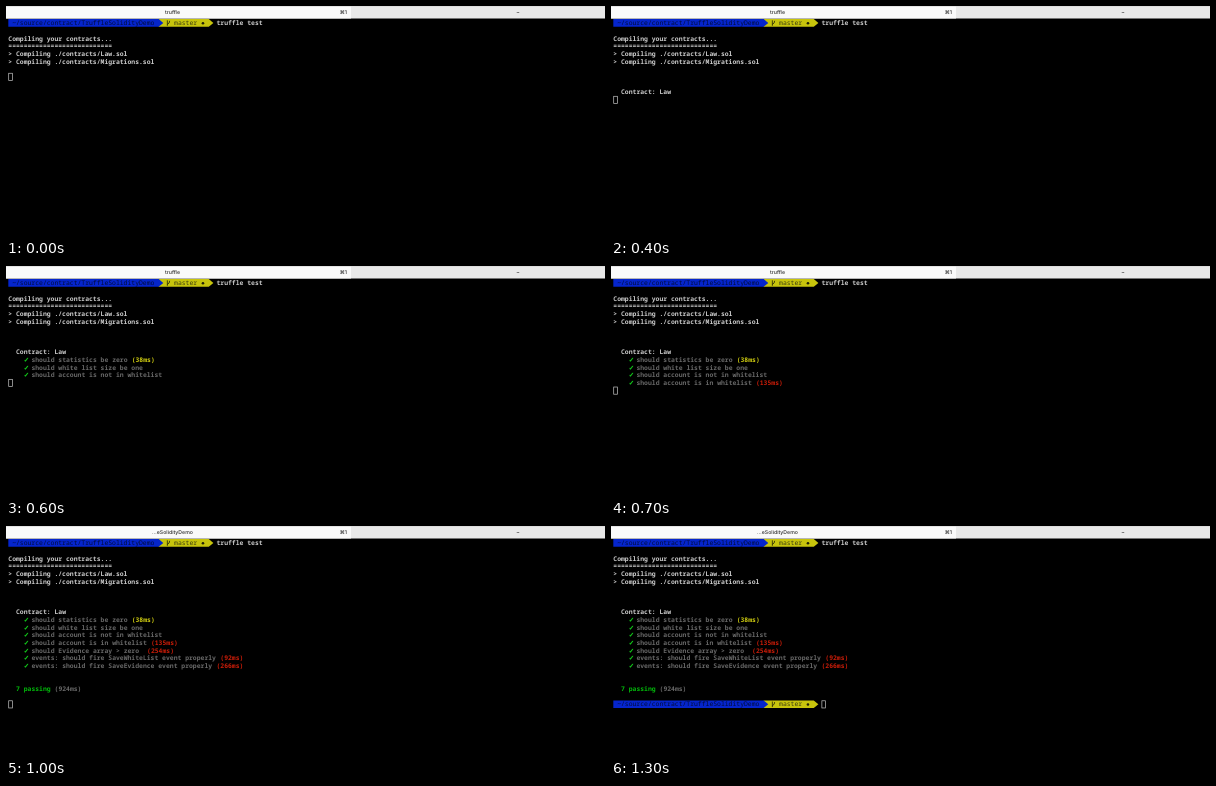
Animation of 599 by 232 pixels, one loop 1.4 s. Source, as an HTML page:

```html
<!DOCTYPE html>
<html lang="en">
<head>
<meta charset="utf-8">
<title>Terminal test run</title>
<style>
  html, body { margin: 0; width: 100%; height: 100%; overflow: hidden; background: #000; }
  svg { display: block; width: 599px; height: 232px; }
  text { font: 600 6.425px "Noto Sans Mono", "DejaVu Sans Mono", monospace; white-space: pre; text-rendering: geometricPrecision; }
  .tab { font: 500 5.2px Inter, "DejaVu Sans", sans-serif; fill: #2c2c2c; text-anchor: middle; }
  .path { fill: #000c38; font-weight: 500; }
  .branch { fill: #3a3a12; font-weight: 500; }
  .main { fill: #cacaca; }
  .dim { fill: #686868; }
  .warn { fill: #cfcc10; }
  .slow { fill: #c81c08; }
  .good { fill: #00b80a; }
  .tick { font-family: "DejaVu Sans", sans-serif; font-size: 6.6px; fill: #14d21c; stroke: #14d21c; stroke-width: .3px; }
  .faint { font-family: "DejaVu Sans", sans-serif; font-size: 5.4px; fill: #808080; }
</style>
</head>
<body>
<svg id="stage" viewBox="0 0 599 232">
  <rect width="599" height="232" fill="#000"/>
  <rect width="599" height="12.5" fill="#e9e9e9"/>
  <rect width="345" height="12.5" fill="#fafafa"/>
  <rect width="599" height=".6" fill="#d6d6d6"/>
  <text id="title" class="tab" x="166.5" y="8.3">truffle</text>
  <text class="tab" x="337.3" y="8.3">⌘1</text>
  <text class="tab" x="512" y="8.3">~</text>
</svg>
<script>
const LOOP = 1400, CELL = 3.855, ROW = 7.68, LEFT = 2.3, TOP = 13.1;
const stage = document.getElementById('stage');
const title = document.getElementById('title');
const timed = [];

const colX = col => LEFT + col * CELL;
const rowY = row => TOP + row * ROW;

function add(tag, attrs, from = 0, to = LOOP) {
  const el = document.createElementNS('http://www.w3.org/2000/svg', tag);
  for (const key in attrs) el.setAttribute(key, attrs[key]);
  stage.append(el);
  if (from > 0 || to < LOOP) timed.push({ el, from, to });
  return el;
}

function write(row, col, kind, str, from, to) {
  add('text', { x: colX(col), y: rowY(row) + 6.1, class: kind }, from, to).textContent = str;
}

function prompt(row, from) {
  const y = rowY(row), mid = y + ROW / 2, end = y + ROW;
  const flag = (a, b, fill) => add('path', {
    d: `M${colX(a)} ${y}H${colX(b)}L${colX(b + 1.2)} ${mid}L${colX(b)} ${end}H${colX(a)}Z`, fill
  }, from);
  flag(39, 52, '#c7c40c');
  flag(0, 39, '#0525cc');
  write(row, 1, 'path', '~/source/contract/TruffleSolidityDemo', from);
  const x = colX(41) + 1;
  add('path', {
    d: `M${x} ${y + 1.2}V${end - 1}M${x} ${mid + 1.4}Q${x + 2.3} ${mid + .6} ${x + 2.3} ${y + 1.7}`,
    fill: 'none', stroke: '#222208', 'stroke-width': .8
  }, from);
  write(row, 43, 'branch', 'master', from);
  add('circle', { cx: colX(50) + 1.9, cy: mid + .3, r: 1.3, fill: '#222208' }, from);
}

prompt(0);
write(0, 54, 'main', 'truffle test');
write(2, 0, 'main', 'Compiling your contracts...');
write(3, 0, 'main', '='.repeat(27));
write(4, 0, 'main', '> Compiling ./contracts/Law.sol');
write(5, 0, 'main', '> Compiling ./contracts/Migrations.sol');
write(9, 2, 'main', 'Contract: Law', 400);

// start time, description, duration, duration colour, extra gap
const tests = [
  [500, 'should statistics be zero', '(38ms)', 'warn'],
  [600, 'should white list size be one'],
  [600, 'should account is not in whitelist'],
  [700, 'should account is in whitelist', '(135ms)', 'slow'],
  [800, 'should Evidence array > zero', '(254ms)', 'slow', 1],
  [800, 'events: should fire SaveWhiteList event properly', '(92ms)', 'slow'],
  [900, 'events: should fire SaveEvidence event properly', '(266ms)', 'slow']
];
tests.forEach(([from, name, ms, kind, gap = 0], i) => {
  const row = 10 + i;
  if (i === 0) write(row, 4, 'faint', '✓', from, 600);
  write(row, 4, 'tick', '✓', Math.max(from, 600));
  write(row, 6, 'dim', name, from);
  if (ms) write(row, 7 + name.length + gap, kind, ms, from);
});

write(19, 2, 'good', '7 passing', 900);
write(19, 12, 'dim', '(924ms)', 900);
prompt(21, 1100);

// time, row, column
const cursorSteps = [
  [0, 7, 0], [400, 10, 0], [500, 11, 0], [600, 13, 0],
  [700, 14, 0], [800, 16, 0], [900, 21, 0], [1100, 21, 54]
];
const cursor = add('rect', {
  width: CELL - .1, height: ROW - .5, fill: 'none', stroke: '#c4c4c4', 'stroke-width': .7
});

function draw(now) {
  const t = now % LOOP;
  for (const { el, from, to } of timed) {
    el.style.visibility = t >= from && t < to ? 'visible' : 'hidden';
  }
  const [, row, col] = cursorSteps.filter(step => t >= step[0]).pop();
  cursor.setAttribute('x', colX(col) + .4);
  cursor.setAttribute('y', rowY(row) + .4);
  const label = t < 1000 ? 'truffle' : '…eSolidityDemo';
  if (title.textContent !== label) title.textContent = label;
}

const start = performance.now();
function tick(now) {
  draw(Math.max(0, now - start));
  requestAnimationFrame(tick);
}
draw(0);
requestAnimationFrame(tick);
</script>
</body>
</html>
```
